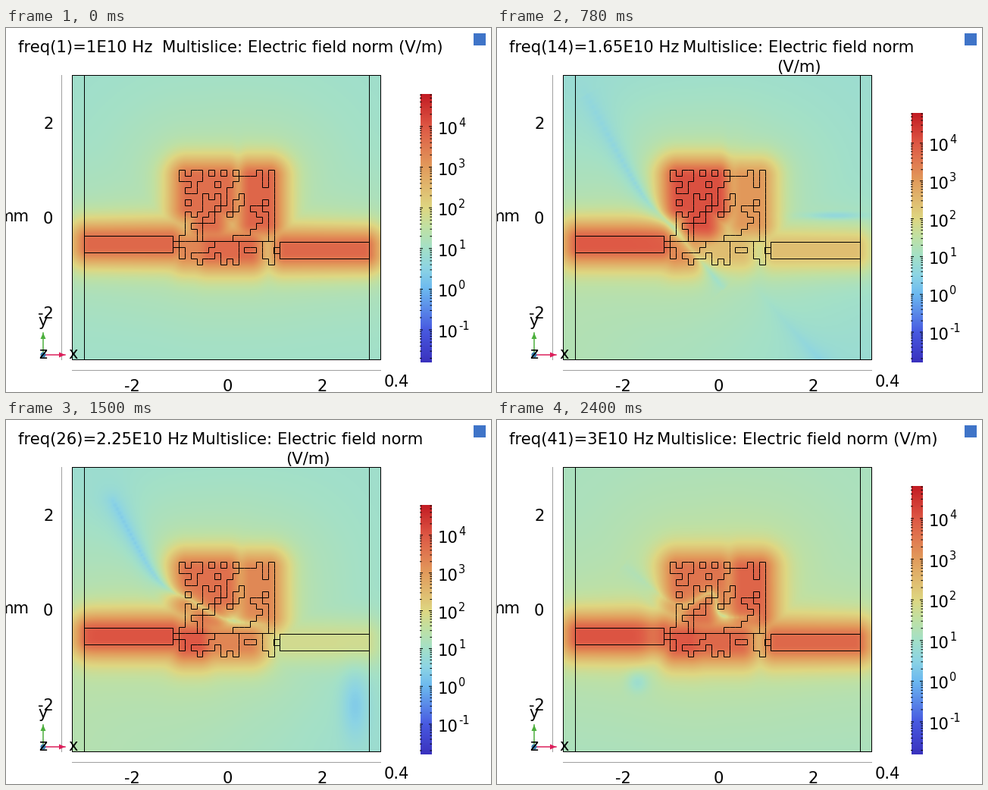
Recreate the animation shown at these times as a matplotlib script. Size 640 by 480 pixels, loop 2.46 s.

```python
import numpy as np
import matplotlib.pyplot as plt
from matplotlib.animation import FuncAnimation
from matplotlib.collections import LineCollection
from matplotlib.colors import LinearSegmentedColormap
from matplotlib.patches import Circle, Polygon, Rectangle

W, H, DPI = 640, 480, 100
FRAMES, STEP = 41, 60
PX = 72 / DPI                      # points per pixel
LOW, HIGH = -1.8, 4.8              # colour range, log10 of V/m
LEFT, RIGHT, TOP, BOTTOM = 87.5, 494.5, 62.5, 437.5
CELLS, CELL, PATCH_X, PATCH_Y = 16, 7.84, 228.6, 187.2

STOPS = [(LOW, "#3a32be"), (-1, "#485ae1"), (0, "#6cb9f0"), (0.5, "#8cd4e4"),
         (1, "#a3e0c8"), (1.5, "#bee1a5"), (2, "#ded782"), (3, "#e29c5c"),
         (4, "#de5845"), (HIGH, "#c31c23")]
CMAP = LinearSegmentedColormap.from_list(
    "field", [((v - LOW) / (HIGH - LOW), c) for v, c in STOPS], N=512)

NX, NY = 204, 188
U, V = np.meshgrid((np.arange(NX) + .5) / NX, (np.arange(NY) + .5) / NY)
X = LEFT + U * (RIGHT - LEFT)
Y = TOP + V * (BOTTOM - TOP)


def bump(f, centre, width, power=2):
    return np.exp(-np.abs((f - centre) / width) ** power)


def step(f, centre, width):
    return .5 + .5 * np.tanh((f - centre) / width)


def spot(x, y, rx, ry):
    return np.exp(-((X - x) / rx) ** 2 - ((Y - y) / ry) ** 2)


def glow(x0, x1, y0, y1):
    dx = np.maximum(np.maximum(x0 - X, X - x1), 0)
    dy = np.maximum(np.maximum(y0 - Y, Y - y1), 0)
    d = np.hypot(dx, dy)
    return .8 * np.exp(-(d / 27) ** 1.8) + .2 * np.exp(-d / 70)


# Each conductor: its glow and its level (log10) against frequency in GHz.
METAL = [
    (glow(109, 216, 280, 290), lambda f: 3.75 + .3 * step(f, 16, 1)),
    (glow(368, 473, 288, 298), lambda f: 3.75 - 2 * bump(f, 20.5, 5, 4)),
    (np.maximum(glow(238, 292, 196, 238), glow(258, 276, 235, 262)),
     lambda f: 3.6 + .5 * bump(f, 16, 4)),
    (glow(322, 346, 196, 258), lambda f: 3.8 - 1.1 * bump(f, 19, 4)),
    (glow(268, 322, 285, 300), lambda f: 3.75 - 1.5 * bump(f, 18, 4)),
    (glow(236, 255, 285, 300), lambda f: 3.3 + .7 * step(f, 18, 1.5)),
]

# Cold spots and the frequency at which each is deepest
COLD = [(13.5, spot(200, 412, 33, 35)), (16.5, spot(445, 248, 40, 5)),
        (22.5, spot(460, 375, 18, 45)), (26.5, spot(108, 178, 8, 25)),
        (30, spot(185, 345, 14, 15))]

# The null line passes through five points that drift with frequency.
DRIFT = [16.5, 20, 27]
NULL = np.array([
    [(115, 85), (188, 215), (230, 262), (262, 300), (300, 345)],
    [(127, 62), (178, 190), (225, 245), (285, 266), (345, 277)],
    [(165, 190), (235, 243), (283, 229), (296, 258), (352, 260)]])

MIDDLE = spot(290, 240, 150, 130)
NOTCH = spot(306, 200, 7, 45)
NULL_WIDTH = 4 + .05 * np.hypot(X - 290, Y - 250)


def smooth(points, n=20):
    """Catmull-Rom curve through the points."""
    p = np.vstack([2 * points[0] - points[1], points,
                   2 * points[-1] - points[-2]])
    t = np.linspace(0, 1, n, endpoint=False)[:, None]
    parts = [.5 * (2 * b + (c - a) * t + (2 * a - 5 * b + 4 * c - d) * t ** 2
                   + (3 * b - a - 3 * c + d) * t ** 3)
             for a, b, c, d in zip(p, p[1:], p[2:], p[3:])]
    return np.vstack(parts + [points[-1:]])


def groove(curve, depths):
    best = np.full_like(X, 1e9)
    depth = np.zeros_like(X)
    for (x, y), z in zip(curve, depths):
        d = (X - x) ** 2 + (Y - y) ** 2
        near = d < best
        best[near] = d[near]
        depth[near] = z
    return depth * np.exp(-np.sqrt(best) / NULL_WIDTH)


def null_line(f):
    points = np.apply_along_axis(lambda q: np.interp(f, DRIFT, q), 0, NULL)
    s = np.linspace(0, 1, 81)
    depths = (1.4 * np.sqrt(np.abs(np.sin(np.pi * s)))
              * (.4 + .6 * np.minimum(1, 2 * s))
              + .9 * (1 - s) ** 2 * bump(f, 20.5, 3))
    return step(f, 15.3, .6) * groove(smooth(points), depths)


def null_tail(f):
    s = np.linspace(0, 1, 60)
    curve = np.column_stack([330 + 95 * s, 325 + 112 * s ** .9])
    return bump(f, 18.5, 1.7) * groove(curve, .1 + 1.5 * s)


def field(f):
    tilt = bump(f, 19.5, 4.5)
    cross = (2 * U - 1) * (2 * V - 1)
    base = (.9 + .01 * (f - 10) + .3 * MIDDLE
            + tilt * (.3 * (V - U) - .2 * cross - .1))
    parts = [np.maximum(level(f) - base, 0) * g for g, level in METAL]
    value = base + sum(p ** 10 for p in parts) ** .1
    value -= .9 * bump(f, 13.5, 2.5) * NOTCH
    for centre, shape in COLD:
        value -= .6 * bump(f, centre, 1.5) * shape
    # standing-wave node sliding along the left feed
    g = f - 22.5
    node = spot(92 + 8 * g + .95 * g * g, 285, 14, 45)
    value -= 1.7 * bump(f, 26.5, 3) * node
    return value - null_line(f) - null_tail(f)


fig = plt.figure(figsize=(W / DPI, H / DPI), dpi=DPI, facecolor="white")
ax = fig.add_axes([0, 0, 1, 1])
ax.axis("off")


def text(x, y, s, size=21, **kw):
    return ax.text(x, y, s, fontsize=size * PX, family="DejaVu Sans",
                   color="black", va="baseline", zorder=6, **kw)


def lines(segments, color="black"):
    art = LineCollection(segments, colors=color, linewidths=PX, zorder=4)
    art.set_snap(False)
    return ax.add_collection(art)


def outline(x0, x1, y0, y1):
    return [(x0, y0), (x1, y0), (x1, y1), (x0, y1), (x0, y0)]


def patch_cells():
    """Random pixel patch with fingers on top and a solid right edge."""
    noise = np.random.default_rng(7).random((CELLS, CELLS))
    near = sum(np.roll(noise, s, a) for s in (-1, 1) for a in (0, 1)) / 4
    cells = noise + near > 1
    cells[0] = np.isin(np.arange(CELLS), [0, 2, 3, 5, 7, 9, 13, 15])
    cells[:11, -1] = True
    cells[-1, ::2] = False
    return cells


def patch_edges():
    cells = np.pad(patch_cells(), 1).astype(int)
    segs = []
    for r, c in np.argwhere(np.diff(cells, axis=1)):
        segs.append([(c, r - 1), (c, r)])
    for r, c in np.argwhere(np.diff(cells, axis=0)):
        segs.append([(c - 1, r), (c, r)])
    origin = np.array([PATCH_X, PATCH_Y])
    return [np.floor(origin + CELL * np.array(s)) + .5 for s in segs]


def color_bar(top):
    bottom = 441
    scale = (bottom - top) / (HIGH - LOW)

    def level(v):
        return bottom - (v - LOW) * scale

    art = [ax.imshow(np.linspace(HIGH, LOW, 400)[:, None], cmap=CMAP,
                     vmin=LOW, vmax=HIGH, aspect="auto", zorder=2,
                     extent=(546.5, 561.5, bottom, top))]
    ticks = []
    for e in range(-2, 5):
        for m in range(1, 10):
            v = e + np.log10(m)
            if LOW <= v <= HIGH:
                y, n = level(v), 4 if m == 1 else 2.5
                ticks += [[(546, y), (546 + n, y)], [(562 - n, y), (562, y)]]
    art.append(lines(ticks))
    for e in range(-1, 5):
        y = level(e)
        art += [text(569.5, y + 10, "10"), text(597, y, str(e), 14.5)]
    return art


def arrow(tip, base, color):
    (x1, y1), (x0, y0) = tip, base
    ax.plot([x0, x1], [y0, y1], color=color, lw=1.5 * PX, zorder=5)
    dx, dy = np.sign(x1 - x0), np.sign(y1 - y0)
    bx, by = x1 - 8 * dx, y1 - 8 * dy
    ax.add_patch(Polygon([(x1, y1), (bx - 3.5 * dy, by + 3.5 * dx),
                          (bx + 3.5 * dy, by - 3.5 * dx)],
                         color=color, lw=0, zorder=5))


image = ax.imshow(field(10), cmap=CMAP, vmin=LOW, vmax=HIGH, aspect="auto",
                  interpolation="bilinear", zorder=1,
                  extent=(LEFT, RIGHT, BOTTOM, TOP))
bars = {False: color_bar(87), True: color_bar(112)}
ax.set_xlim(0, W)
ax.set_ylim(H, 0)

lines([outline(LEFT, RIGHT, TOP, BOTTOM),
       outline(103.5, 479.5, TOP, BOTTOM),
       outline(103.5, 220.5, 274.5, 296.5),
       outline(361.5, 479.5, 282.5, 304.5),
       outline(220.5, 228.5, 281.5, 289.5),
       outline(353.5, 361.5, 289.5, 297.5),
       [(244.5, 281.5), (353.5, 281.5)]] + patch_edges())
lines([[(73.5, 62), (73.5, 438)], [(87, 451.5), (495, 451.5)]], "#a0a0a0")

for v in (-2, 0, 2):
    text(62.5, 258 - 62.6 * v, str(v), ha="right")
    text(292 + 62.6 * v, 479, str(v), ha="center")
text(515, 473, "0.4", ha="center")
text(-11, 255, "mm")

arrow((49, 402), (49, 431), "#4caf3c")
arrow((78, 431), (49, 431), "#dc1e5a")
ax.add_patch(Circle((49, 431), 3.5, color="#3c82b4", lw=0, zorder=5))
for x, y, s in ((49, 393, "y"), (49, 436, "z"), (89, 436, "x")):
    text(x, y, s, ha="center")
ax.add_patch(Rectangle((617, 7), 16, 16, color="#3f74c8", lw=0, zorder=5))

freq = text(15.5, 32, "", 21.1)
label = text(206, 32, "", 21.1)
unit = text(0, 58, "(V/m)", 21.1, ha="center")


def draw(i):
    value = f"{1 + .05 * i:.2f}".rstrip("0").rstrip(".")
    name = f"freq({i + 1})={value}E10 Hz"
    extra = len(name) - len("freq(1)=1E10 Hz")
    x = max(206, 198 + 13.36 * extra - 6.7 * ("." in value))
    wrapped = bool(x > 220)
    freq.set_text(name)
    label.set_x(x)
    label.set_text("Multislice: Electric field norm"
                   + ("" if wrapped else " (V/m)"))
    unit.set_x(x + 154)
    unit.set_visible(wrapped)
    for state, artists in bars.items():
        for art in artists:
            art.set_visible(state == wrapped)
    image.set_data(field(10 + .5 * i))
    return []


anim = FuncAnimation(fig, draw, frames=FRAMES, interval=STEP,
                     init_func=lambda: [], blit=False, repeat=True)
plt.show()
```
